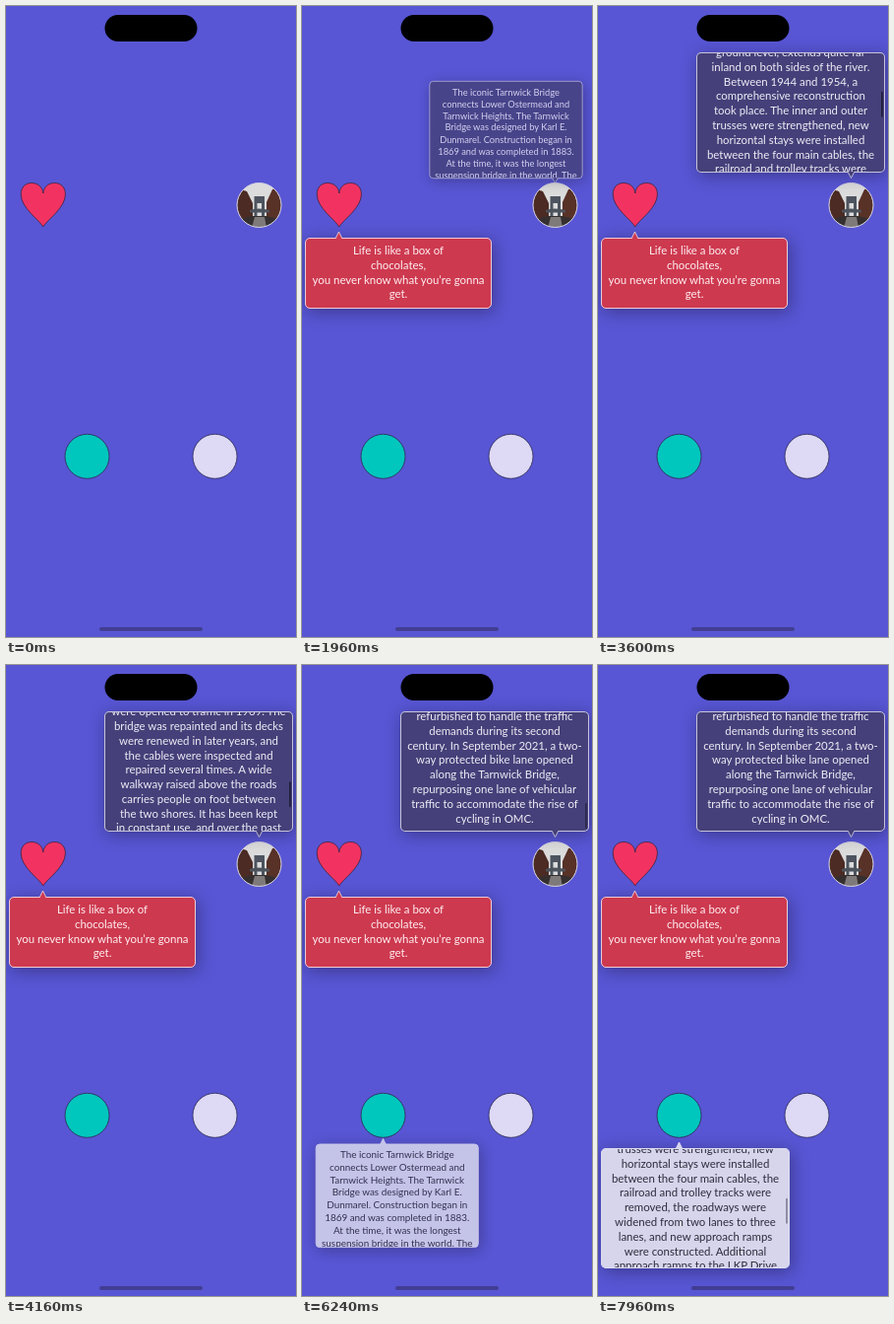
Write an HTML page that moves like this. It is 295 px wide and 640 px high and loops after 8000 ms.

```html
<!DOCTYPE html>
<html lang="en">
<head>
<meta charset="utf-8">
<title>Popovers</title>
<style>
  html, body { margin: 0; width: 100%; height: 100%; overflow: hidden; background: #5856d4; }
  #stage { position: absolute; left: 0; top: 0; width: 295px; height: 640px; overflow: hidden; }
  #stage > svg { position: absolute; left: 0; top: 0; }
  .popover { position: absolute; color: var(--ink); opacity: 0; }
  .box {
    position: absolute; inset: 0; box-sizing: border-box; overflow: hidden;
    border: 1px solid var(--edge); border-radius: 5px;
    background: var(--fill); box-shadow: 2px 3px 17px rgba(0, 0, 0, .34);
  }
  .text {
    padding-top: 5px; text-align: center; white-space: pre;
    font: 11.45px/14.8px Lato, "Open Sans", sans-serif;
  }
  .thumb { position: absolute; right: 1px; top: 2.5px; width: 2.4px; height: 26px; border-radius: 2px; opacity: 0; }
  .arrow { position: absolute; overflow: visible; fill: var(--fill); stroke: var(--edge); stroke-width: .9; }
  #red { left: 3px; top: 235px; width: 190px; height: 71.5px; transform-origin: 34.5px -33px;
    --fill: #cd394f; --edge: #efccd6; --ink: #fff0f2; }
  #blue { left: 100px; top: 47px; width: 192px; height: 122px; transform-origin: 157.5px 155px;
    --fill: #454079; --edge: #c6c3da; --ink: #eeecf6; }
  #pale { left: 3px; top: 490px; width: 192px; height: 122px; transform-origin: 79.5px -33px;
    --fill: #d6d5ec; --edge: #dddcf0; --ink: #2e2c3c; }
  #blue .text { padding-top: 6px; }
  #blue .thumb { background: #252142; }
  #pale .thumb { background: #8f8ea3; }
</style>
</head>
<body>
<div id="stage">
  <svg width="295" height="640" viewBox="0 0 295 640">
    <rect x="100.5" y="9" width="94" height="27" rx="13.5"/>
    <rect x="95" y="630" width="105" height="4" rx="2" fill="#423e93"/>
    <path d="M37.8 224C34 217 15.200 205 15.200 191C15.200 183.500 20 179.500 26 179.500C32 179.500 37 183 37.800 190C38.600 183 43.500 179.500 49.500 179.500C55.500 179.500 60.400 183.500 60.400 191C60.400 205 41.600 217 37.800 224Z"
      fill="#f23361" stroke="#3a2440" stroke-width=".8"/>
    <g stroke="#2c2a50" stroke-width=".8">
      <circle cx="82.500" cy="456.800" r="22.500" fill="#00c7be"/>
      <circle cx="212.500" cy="456.800" r="22.500" fill="#dedaf6"/>
    </g>
    <clipPath id="round"><circle cx="257.500" cy="202" r="22.500"/></clipPath>
    <g clip-path="url(#round)">
      <rect x="235" y="179" width="46" height="46" fill="#dcdcdd"/>
      <path d="M235 185L245 188L251 200V214L235 222Z" fill="#4c2b24"/>
      <path d="M281 182L271 186L265 199V214L281 222Z" fill="#583127"/>
      <path d="M252.500 193H263V215H260V200H255.500V215H252.500Z" fill="#4d545f"/>
      <path d="M248 207Q257 204 268 207V209.500H248Z" fill="#4d535c"/>
      <path d="M235 217L250 213H265L281 217V225H235Z" fill="#35302f"/>
      <path d="M253 214H263L265 225H250Z" fill="#7e7a79"/>
    </g>
    <circle cx="257.500" cy="202" r="22.500" fill="none" stroke="#d6d3e4" stroke-width="1"/>
  </svg>

  <div class="popover" id="red">
    <div class="box"><div class="text">Life is like a box of
chocolates,
you never know what you’re gonna
get.</div></div>
    <svg class="arrow" style="left:31px;top:-6px" width="7" height="7"><path d="M0 7L3.500 0L7 7"/></svg>
  </div>
  <div class="popover" id="blue">
    <div class="box"><div class="text"></div><div class="thumb"></div></div>
    <svg class="arrow" style="left:154px;top:121px" width="7" height="7"><path d="M0 0L3.500 6.500L7 0"/></svg>
  </div>
  <div class="popover" id="pale">
    <div class="box"><div class="text"></div><div class="thumb"></div></div>
    <svg class="arrow" style="left:76px;top:-6px" width="7" height="7"><path d="M0 7L3.500 0L7 7"/></svg>
  </div>
</div>

<script>
const ARTICLE = `The iconic Tarnwick Bridge
connects Lower Ostermead and
Tarnwick Heights. The Tarnwick
Bridge was designed by Karl E.
Dunmarel. Construction began in
1869 and was completed in 1883.
At the time, it was the longest
suspension bridge in the world. The
Tarnwick Bridge connects the
boroughs of Ostermead and
Tarnwick by spanning the Vask
River. Because of the elevation of
the span above the Vask River and
the relatively low-lying shores, the
rest of the bridge, sloping down to
ground level, extends quite far
inland on both sides of the river.
Between 1944 and 1954, a
comprehensive reconstruction
took place. The inner and outer
trusses were strengthened, new
horizontal stays were installed
between the four main cables, the
railroad and trolley tracks were
removed, the roadways were
widened from two lanes to three
lanes, and new approach ramps
were constructed. Additional
approach ramps to the LKP Drive
were opened to traffic in 1969. The
bridge was repainted and its decks
were renewed in later years, and
the cables were inspected and
repaired several times. A wide
walkway raised above the roads
carries people on foot between
the two shores. It has been kept
in constant use, and over the past
decades, the structure has been
refurbished to handle the traffic
demands during its second
century. In September 2021, a two-
way protected bike lane opened
along the Tarnwick Bridge,
repurposing one lane of vehicular
traffic to accommodate the rise of
cycling in OMC.`;

const LOOP = 8000;
const MAX_SCROLL = 585.6;
const THUMB_TRAVEL = 89;
const clamp01 = x => Math.min(1, Math.max(0, x));

function spring(ms) {
  if (ms <= 0) return 0;
  const w = 11.7 * ms / 1000;
  return 1 - Math.exp(-0.6 * w) * (Math.cos(0.8 * w) + 0.75 * Math.sin(0.8 * w));
}

// A short finger drag, then exponential deceleration.
function flick(ms, drag, speed) {
  const dragTime = 130;
  if (ms <= 0) return 0;
  if (ms < dragTime) return drag * (ms / dragTime) ** 1.3;
  return drag + speed / 2 * (1 - Math.exp(-2 * (ms - dragTime) / 1000));
}

// Two flicks; the second runs into the end of the text and bounces.
function blueScroll(t) {
  const second = 3760, hit = 4905;
  if (t > hit) {
    const s = (t - hit) / 1000;
    return MAX_SCROLL + 83 * s * Math.exp(-10 * s);
  }
  return flick(Math.min(t, second) - 2670, 60, 440) + flick(t - second, 62, 635);
}

const paleScroll = t => flick(t - 7030, 61.7, 617);

const popovers = [
  { id: "red", opens: 660 },
  { id: "blue", opens: 1783, scroll: blueScroll, thumb: t => t < 2680 ? 0 : 1 - clamp01((t - 6160) / 280) },
  { id: "pale", opens: 6050, scroll: paleScroll, thumb: t => t < 7040 ? 0 : 1 },
].map(p => {
  const el = document.getElementById(p.id);
  const text = el.querySelector(".text");
  if (p.scroll) text.textContent = ARTICLE;
  return { ...p, el, text, bar: el.querySelector(".thumb") };
});

function draw(now) {
  const t = now % LOOP;
  for (const p of popovers) {
    const scale = spring(t - p.opens);
    p.el.style.transform = `scale(${scale})`;
    p.el.style.opacity = clamp01(scale);
    if (!p.scroll) continue;
    const y = p.scroll(t);
    p.text.style.transform = `translateY(${-y}px)`;
    p.bar.style.transform = `translateY(${clamp01(y / MAX_SCROLL) * THUMB_TRAVEL}px)`;
    p.bar.style.opacity = p.thumb(t);
  }
  requestAnimationFrame(draw);
}
draw(performance.now());
</script>
</body>
</html>
```
